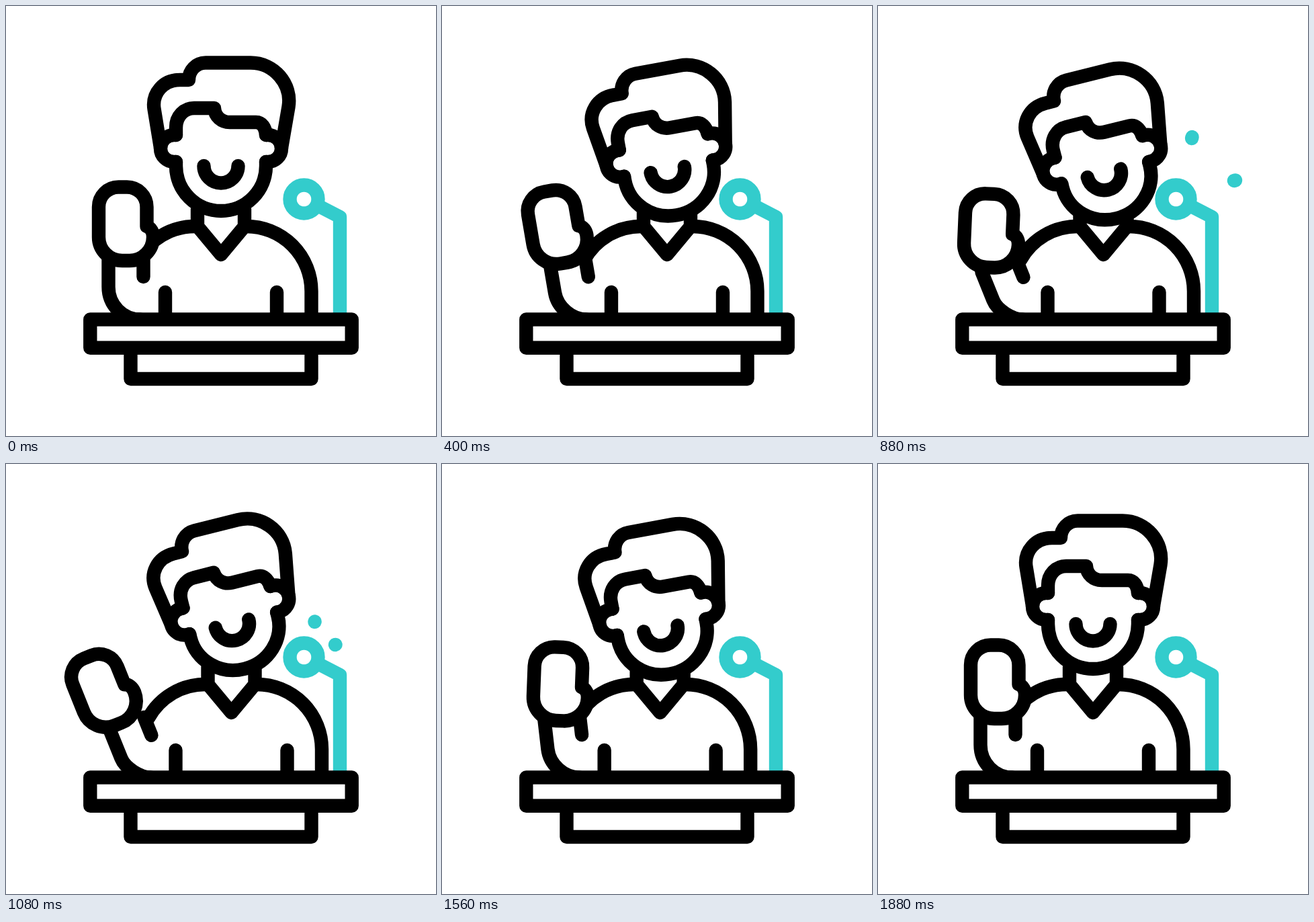
Write an HTML page that moves like this. It is 640 px wide and 640 px high and loops after 2000 ms.

```html
<!DOCTYPE html>
<html lang="en">
<head>
<meta charset="utf-8">
<title>Speaker at a lectern</title>
<style>
  html, body { margin: 0; width: 100%; height: 100%; overflow: hidden; background: #fff; }
  svg { display: block; width: 100%; height: 100%; }
  .ink { stroke: #000; }
  .teal { stroke: #33cccc; }
  .solid { fill: #fff; }
  .round { stroke-linecap: round; }
</style>
</head>
<body>
<svg viewBox="0 0 640 640" fill="none" stroke-width="20.4" stroke-linejoin="round">
  <g class="teal">
    <path d="M466 298L497 314V460"/>
    <circle cx="443.5" cy="287.5" r="21"/>
    <path id="sparks" class="round"/>
  </g>

  <g id="body" class="ink round">
    <path d="M285 302V328L320 370L355 328V302"/>
    <path d="M285 328H281A96.5 96.5 0 0 0 196.5 378"/>
    <path d="M355 328H358A96.5 96.5 0 0 1 454.5 424.5V464"/>
    <path d="M237 426V464M403 426V464"/>
  </g>
  <path id="arm" class="ink round"/>

  <g class="ink solid">
    <path d="M185.5 508.5V555H454.5V508.5Z"/>
    <path d="M125.3 466.5H514.7V508.7H125.3Z"/>
  </g>

  <g id="head" class="ink round">
    <path id="face" class="solid"/>
    <path d="M253 192H250A20 20 0 0 0 250 232H253M387 192H390A20 20 0 0 1 390 232H387"/>
    <path d="M230 211L220.5 153C217 130 234 110 259 110H272C272 96 283 84.5 297 84.5H364C399 84.5 426 116 420.5 150L410 211"/>
    <path d="M253 192V181C253 164 265 152 280 152H310C311 165 321 173 333 173H372C381 173 386 181 387 192"/>
  </g>
  <path id="smile" class="ink round" d="M294.5 238A25.5 25.5 0 0 0 345.5 238"/>

  <path id="hand" class="ink solid" d="M209.5 328V299A29.5 29.5 0 0 0 180 269.5H167.5A29.5 29.5 0 0 0 138 299V344A35 35 0 0 0 173 379H184A35 35 0 0 0 219 344C219 337 216 330 209.5 328Z"/>
</svg>
<script>
const LOOP = 2000, STEP = 40, LEAN = 22;
const $ = id => document.getElementById(id);

// Eased 0 to 1 between two times.
function ease(t, from, to) {
  const p = Math.min(1, Math.max(0, (t - from) / (to - from)));
  return p * p * (3 - 2 * p);
}

// Rises from a to b, holds, then falls from c to d.
const pulse = (t, a, b, c, d) => ease(t, a, b) - ease(t, c, d);

function place(id, x, y, angle = 0, cx = 0, cy = 0) {
  $(id).setAttribute('transform', `translate(${x} ${y}) rotate(${angle} ${cx} ${cy})`);
}

// The forearm leans about a point near its lower end; the sleeve stays on the desk.
function drawArm(shift, lift) {
  const r = -LEAN * lift * Math.PI / 180, c = Math.cos(r), s = Math.sin(r);
  const px = 204.8, py = 412.6, desk = 466.5;
  const turn = (x, y) => [
    px + shift + (x - px) * c - (y - py) * s,
    py + (x - px) * s + (y - py) * c
  ];
  const outer = 152.5 - 2.5 * lift;
  const elbow = turn(outer, 418);
  const bend = 0.55 * (desk - elbow[1]);
  const end = 200 + shift;
  $('arm').setAttribute('d',
    `M${turn(outer, 372)}L${elbow}` +
    `C${turn(outer, 418 + bend)} ${end - bend} ${desk} ${end} ${desk}` +
    `M${turn(204.5, 374)}L${turn(204.5, 403)}`);
}

// Two strokes fly outward; each tail follows its front after a delay.
function drawSparks(t) {
  const start = t < 1060 ? 500 : 1060;
  const front = ease(t, start, start + 305);
  const tail = ease(t, start + 116, start + 421);
  const ray = (x, y, dx, dy) =>
    `M${x + dx * tail} ${y + dy * tail}L${x + dx * front} ${y + dy * front}`;
  const visible = front - tail > 0.01;
  $('sparks').setAttribute('d',
    visible ? ray(459.5, 235, 8, -40) + ray(490, 269, 42, -9.5) : '');
}

function draw(t) {
  const shift = 15.5 * pulse(t, 80, 440, 1280, 1720);
  const tilt = pulse(t, 80, 560, 1400, 1880);
  const lift = pulse(t, 160, 680, 1280, 1720);
  const nod = 3.5 * pulse(t, 660, 860, 1320, 1720) - 11.5 * pulse(t, 860, 1090, 1090, 1320);
  const wave = 25 * (pulse(t, 520, 860, 860, 1090) + pulse(t, 1090, 1350, 1350, 1700));

  place('body', shift, 0);
  place('head', shift - 2.2 * tilt, 13.5 * tilt + nod, -14 * tilt, 320, 212);
  place('smile', shift + tilt, 7.5 * tilt + nod, -14 * tilt, 320, 238);
  place('hand', shift - 27 * lift, 10 * lift, wave - LEAN * lift, 173.6, 379);
  $('face').setAttribute('d', `M253 232V238A67 ${67 - 3 * tilt} 0 0 0 387 238V232`);
  drawArm(shift, lift);
  drawSparks(t);
}

function tick() {
  const t = performance.now() % LOOP;
  draw(Math.floor(t / STEP) * STEP);
  requestAnimationFrame(tick);
}
tick();
</script>
</body>
</html>
```
